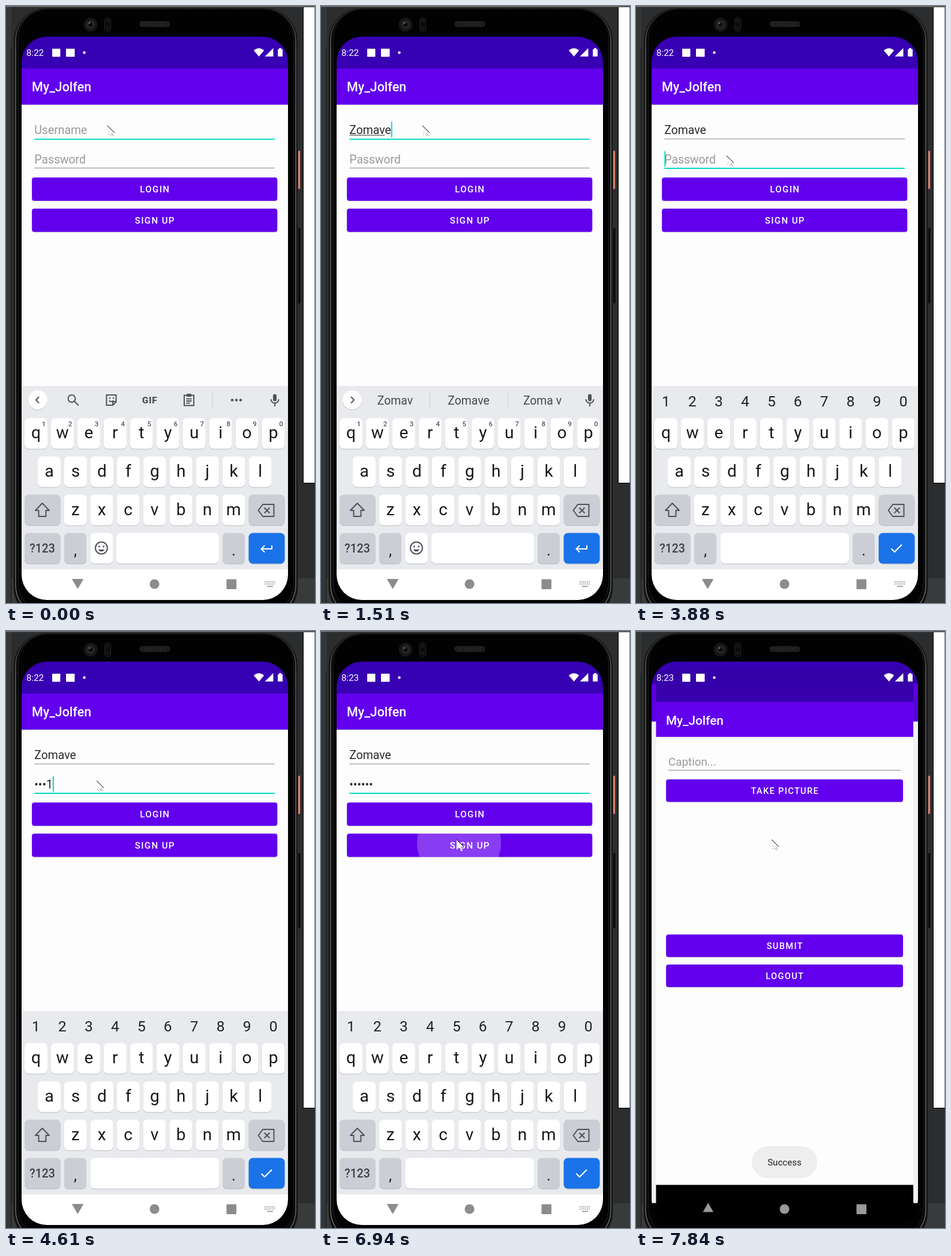
An HTML page for the animation above (7.99 s loop, 515 px wide and 993 px high).

```html
<!DOCTYPE html>
<html lang="en">
<head>
<meta charset="utf-8">
<title>Phone login</title>
<style>
html, body { margin: 0; width: 100%; height: 100%; overflow: hidden; background: #2b2d2e; }
svg { display: block; width: 515px; height: 993px; font-family: Roboto, "Open Sans", sans-serif; }
.line { fill: none; stroke: #50545a; stroke-width: 2; }
.mid { text-anchor: middle; }
.btn { font-size: 15.1px; font-weight: 500; letter-spacing: 1.35px; fill: #fff; text-anchor: middle; }
text { white-space: pre; }
</style>
</head>
<body>
<svg id="stage" viewBox="0 0 515 993"></svg>
<script>
const LOOP = 7990;
const USER = "Zomave", APP = "My_Jolfen";
const PURPLE = "#6200ee", DEEP = "#3700b3", TEAL = "#03dac5", PAPER = "#fdfdfd";
const FIELD_X = 47.3, FIELD_SIZE = 19.4;

const rect = (x, y, w, h, fill, rx = 0, more = "") =>
  `<rect x="${x}" y="${y}" width="${w}" height="${h}" rx="${rx}" fill="${fill}" ${more}/>`;
const circle = (x, y, r, fill, more = "") => `<circle cx="${x}" cy="${y}" r="${r}" fill="${fill}" ${more}/>`;
const path = (d, more = 'class="line"') => `<path d="${d}" ${more}/>`;
const text = (x, y, size, fill, s, more = "") =>
  `<text x="${x}" y="${y}" font-size="${size}" fill="${fill}" ${more}>${s}</text>`;
const group = (id, body, more = "") => `<g id="${id}" ${more}>${body}</g>`;
const mid = 'class="mid"';

const button = (x, y, w, h, label, size = 15.1) =>
  rect(x, y + 1, w, h, "#000", 4, 'opacity=".15"') + rect(x, y, w, h, PURPLE, 4) +
  `<text class="btn" x="248.3" y="${y + h / 2 + size * .36}" style="font-size:${size}px">${label}</text>`;

function phone() {
  return rect(0, 0, 515, 993, "#2b2d2e") + rect(0, 952, 515, 41, "#383b3b") +
    rect(0, 0, 9, 993, "#343738") + rect(8, 70, 1, 923, "#161616") +
    rect(495, 0, 20, 794, "#000") + rect(496, 2, 18.5, 791, "#fff") +
    rect(0, 0, 515, 1.5, "#777") +
    rect(486, 240, 5, 65, "#5a3a34", 1) + rect(487, 241, 3, 63, "#dc7f6c", 1) +
    rect(486, 369, 5, 126, "#0b0b0b", 1, 'stroke="#3c3c3c" stroke-width=".6"') +
    rect(12.5, 2.5, 474, 1020, "#111", 56, 'stroke="#303030"') +
    rect(16, 4, 467, 1013, "#090909", 54, 'stroke="url(#rim)" stroke-width="1.5"') +
    rect(20.5, 5, 459, 1004, "#020202", 50, 'stroke="#1c1c1c"') +
    circle(141, 31, 11.5, "#161616") + circle(141, 31, 7, "#25282a") + circle(141, 31, 3.5, "#0b0c0e") +
    circle(139, 28.5, 1.3, "#777") +
    rect(164.5, 19, 10, 24, "#0c0c0c", 5, 'stroke="#242424"') +
    circle(169.5, 24.5, 3, "#161616") + circle(169.5, 37, 3, "#161616") +
    rect(223, 26, 50, 8, "#171717", 4, 'stroke="#303030"') +
    path("M227 30H269", 'stroke="#333" stroke-width="5" stroke-dasharray="1 2"');
}

function statusBar() {
  const white = 'fill="#fff"';
  return text(34, 83, 15.1, "#fff", "8:22", 'id="clock"') +
    rect(77, 71, 13.5, 13.5, "#fff", 1) + rect(100, 71, 14.5, 13.5, "#fff", 1) +
    circle(130.5, 77.5, 2.2, "#fff") +
    path("M413 74Q421.5 66.5 430 74L421.5 84Z", white) + path("M445.5 70V84H431.5Z", white) +
    path("M453 72H455V70H459V72H461V84H453Z", white);
}

function loginScreen() {
  return rect(26, 51, 444, 53, DEEP) + rect(26, 104, 444, 60, PURPLE) + rect(26, 164, 444, 774, PAPER) +
    rect(26, 164, 444, 1, "#ddd") +
    text(43, 142, 21.4, "#fff", APP, 'font-weight="500"') +
    text(FIELD_X, 213, FIELD_SIZE, "#999", "Username", 'id="user"') +
    text(FIELD_X, 261.8, FIELD_SIZE, "#999", "Password", 'id="pass"') +
    rect(FIELD_X, 214.5, 0, 1, "#333", 0, 'id="composing"') +
    rect(47.3, 220.6, 400.6, 2, TEAL, 0, 'id="userLine"') +
    rect(47.3, 269, 400.6, 1, "#888", 0, 'id="passLine"') +
    rect(FIELD_X, 192.5, 2, 26, TEAL, 0, 'id="caret"') +
    button(43.2, 285.2, 409, 38.8, "LOGIN") + button(43.2, 337, 409, 38.8, "SIGN UP") +
    circle(230, 352, 0, "#fff", 'id="ripple" clip-path="url(#signUp)"');
}

const mic = path("M448 645.5a3 3 0 0 1 3 3v6a3 3 0 0 1-6 0v-6a3 3 0 0 1 3-3Z", 'fill="#50545a"') +
  path("M441.5 654a6.5 6.5 0 0 0 13 0M448 661v5");
const chevron = (x, d) => circle(x, 656, 16.3, "#000", 'opacity=".12"') + circle(x, 655, 16, "#fff") +
  path(`M${x - d * 2} 650l${d * 5} 5.3l${-d * 5} 5.3`);
const smiley = (x, y, r) => circle(x, y, r, "none", 'class="line"') +
  circle(x - 3.7, y - 2.5, 1.5, "#50545a") + circle(x + 3.7, y - 2.5, 1.5, "#50545a") +
  path(`M${x - 5} ${y + 2.5}a5.4 5.4 0 0 0 10 0Z`, 'fill="#50545a"');

const COLUMN = i => 50 + 43.95 * i;

function toolbar() {
  const icons = chevron(53, -1) +
    circle(109.5, 653, 6, "none", 'class="line"') + path("M114 657.5l7 7") +
    path("M169 647H183.5V658.5L178 664H167.5V647ZM183.5 658H178V664") +
    circle(173, 652, 1.3, "#50545a") + circle(179, 652, 1.3, "#50545a") + path("M172 656a4 4 0 0 0 7 0") +
    text(239.5, 660.7, 15.5, "#50545a", "GIF", 'class="mid" font-weight="900" letter-spacing=".6"') +
    path("M297 647.5H313V664.5H297ZM300.5 653.5H309.5M300.5 657H309.5M300.5 660.5H306.5") +
    rect(301, 645, 8, 5, "#50545a", 1) + rect(343.5, 643, 1, 24, "#c8cacd") +
    [377, 384, 391].map(x => circle(x, 655.5, 2.2, "#50545a")).join("") + mic;
  const words = chevron(52, 1) + rect(181, 643, 1, 25, "#c8cacd") + rect(311, 643, 1, 25, "#c8cacd") +
    [123.5, 246, 369].map((x, i) => text(x, 663, 19.4, "#454a4f", "", `class="mid" id="word${i}"`)).join("") + mic;
  const digits = [..."1234567890"].map((d, i) => text(COLUMN(i), 665.5, 24.5, "#202124", d, mid)).join("");
  return group("icons", icons) + group("words", words) + group("digits", digits);
}

function keyboard() {
  const key = (x, y, w, fill = "#fff") =>
    rect(x, y + 1, w, 51, "#b9bdc3", 7) + rect(x, y, w, 51, fill, 7);
  const [row1, row2, row3, row4] = [0, 1, 2, 3].map(i => 685.5 + 63.65 * i);
  const row = (letters, x, y) => [...letters].map((c, i) =>
    key(x + 43.95 * i, y, 38) + text(x + 19 + 43.95 * i, y + 33.7, 28, "#16181a", c, mid)).join("");
  const hints = [..."1234567890"].map((d, i) =>
    text(COLUMN(i) + 13, 698.5, 11.5, "#50545a", d, 'class="mid" font-weight="500"')).join("");
  const grey = "#cbced5", thick = 'class="line" stroke-linejoin="round"';
  const white = 'fill="none" stroke="#fff" stroke-width="2.1"';
  return rect(26, 632, 444, 306, "#e8eaed") + toolbar() +
    row("qwertyuiop", 31, row1) + row("asdfghjkl", 53, row2) + row("zxcvbnm", 96.7, row3) +
    group("hints", hints) +
    key(31, row3, 59.7, grey) + path("M60.5 827L72 839H66.5V849H54.5V839H49Z", thick) +
    key(404.5, row3, 60, grey) +
    path("M428 829H446.5V849H428L420.5 839ZM430.5 834.5l9 9M439.5 834.5l-9 9", thick) +
    key(31, row4, 59.7, grey) + text(60.5, 909, 19.4, "#3c4043", "?123", 'class="mid" font-weight="500"') +
    key(97, row4, 37, grey) + text(115.5, 914, 26, "#202124", ",", mid) +
    group("textRow", key(140.5, row4, 37.7) + smiley(159, 901.5, 10) + key(184, row4, 171)) +
    group("passRow", key(140.5, row4, 214.5)) +
    key(361, row4, 37, grey) + text(379.5, 914, 26, "#202124", ".", mid) +
    key(404.5, row4, 60, "#1a73e8") +
    path("M443 897V903H425.5M431 897.5l-5.5 5.5l5.5 5.5", white + ' id="enter"') +
    path("M425.5 902.5l5.5 5.5L443 896", white + ' id="done"');
}

function navBar() {
  const grey = 'fill="#8c8c8c"';
  const dots = [0, 1, 2, 3, 4, 5].map(i =>
    rect(431 + i * 3.1, 957, 1.8, 1.8, "#999") + rect(431 + i * 3.1, 960.5, 1.8, 1.8, "#999")).join("");
  return rect(26, 937, 444, 51, "#fff") + path("M110.5 953.5H128.5L119.5 969Z", grey + ' stroke="#8c8c8c" stroke-linejoin="round"') +
    circle(247.5, 961.5, 8, "#8c8c8c") + rect(367.5, 953.5, 16.5, 16.5, "#8c8c8c", 1) +
    dots + rect(435, 964.5, 10, 1.8, "#999");
}

function homeScreen() {
  const card = (y, h, fill) => rect(33.4, y, 428.8, h, fill);
  return rect(26, 51, 444, 937, "#000") + rect(26, 51, 444, 37, "url(#bar)") +
    rect(26, 88, 444, 62.5, "#5b00de") + rect(26, 150.5, 444, 801, "#f2f2f5") +
    card(51, 67, "url(#bar)") + card(118, 58.3, PURPLE) +
    card(176.3, 745, PAPER) + card(176.3, 1.2, "#ddd") + card(921.3, 67, "#000") +
    text(50, 155.5, 20.7, "#fff", APP, 'font-weight="500"') +
    text(54, 224, 18.8, "#999", "Caption...") + rect(54, 231, 387, 1, "#888") +
    button(50.1, 246.8, 395, 37.4, "TAKE PICTURE", 14.6) +
    button(50.1, 504.8, 395, 37.4, "SUBMIT", 14.6) + button(50.1, 554.8, 395, 37.4, "LOGOUT", 14.6) +
    path("M111.5 966.5H129L120.2 951Z", 'fill="#999"') +
    circle(247.5, 961.5, 8, "#999") + rect(367.5, 953.5, 16.5, 16.5, "#999", 1) +
    rect(193, 857, 109, 53, "#eee", 26.5) + text(247.5, 889.3, 15.1, "#222", "Success", mid);
}

const stage = document.getElementById("stage");
stage.innerHTML = `<defs>
  <clipPath id="screen">${rect(26, 51, 444, 937, "#fff", 42)}</clipPath>
  <clipPath id="signUp">${rect(43.2, 337, 409, 38.8, "#fff", 4)}</clipPath>
  <linearGradient id="bar" gradientUnits="userSpaceOnUse" x1="0" x2="0" y1="56" y2="118">
    <stop stop-color="${DEEP}"/><stop offset=".2" stop-color="#3500a8"/><stop offset="1" stop-color="#3700ae"/>
  </linearGradient>
  <linearGradient id="rim" gradientUnits="userSpaceOnUse" x1="0" x2="0" y1="4" y2="70">
    <stop stop-color="#222"/><stop offset="1" stop-color="#666"/>
  </linearGradient>
  </defs>` + phone() +
  group("display",
    group("login", loginScreen() + keyboard() + navBar() +
      group("toast", rect(194, 863, 107, 27, "#eee", 2, 'opacity=".55"') +
        text(247.5, 889.3, 15.1, "#999", "Success", mid))) +
    group("home", homeScreen()) + statusBar(), 'clip-path="url(#screen)"') +
  group("pointer", path("M0 0L12 12H7.2L10.5 18L7.6 19.2L4.6 13.2L0 17Z", 'fill="#fff"') +
    path("M0 0L12 12", 'stroke="#000" stroke-width="1"') +
    path("M2 11h2M7 12.5l2 1.5M5.5 14l2 3.5M8.5 14.5l1.5 3M1.5 14.5h1", 'stroke="#222" stroke-width=".8" stroke-dasharray="1.2 .8"'));

const $ = Object.fromEntries([...stage.querySelectorAll("[id]")].map(e => [e.id, e]));
const show = (el, on) => el.setAttribute("display", on ? "inline" : "none");
const set = (el, attrs) => { for (const k in attrs) el.setAttribute(k, attrs[k]); };
const label = (el, s) => { if (el.textContent !== s) el.textContent = s; };
// Latest entry whose start time has passed.
const at = (steps, t) => steps.reduce((now, s) => t >= s[0] ? s : now);

// start, letters typed, letters already seen by the keyboard
const typing = [[0, 0, 0], [550, 1, 0], [690, 2, 1], [820, 3, 2], [960, 4, 3], [1100, 4, 4],
  [1240, 5, 4], [1370, 5, 5], [1510, 6, 5], [1630, 6, 6]];
const secret = [[0, 0], [4020, 1], [4170, 2], [4310, 3], [4610, 4], [4800, 5], [5170, 6]];
const blink = [[0, 0], [130, 1], [2040, 0], [2590, 1], [3310, 0], [3880, 1], [5560, 0], [6110, 1], [6660, 0], [7230, 1]];
const moves = [[0, 169, 199], [2180, 165, 209], [2320, 157, 233], [2450, 151, 249],
  [5840, 158, 258], [5980, 181, 288], [6110, 205, 320], [6250, 221, 341], [6390, 226, 347]];
const ripples = [[0, 0, 0], [6800, 70, .24], [6950, 230, .2], [7090, 230, .1], [7230, 0, 0]];
const guesses = [["", "", ""], ["Z", "Zoo", "Zone"], ["Zo", "Zoo", "Zoom"], ["Zom", "Zoom", "Zombie"],
  ["Zoma", "Zomave", "Zom a"], ["Zomav", "Zomave", "Zoma v"], [USER, USER + "'s", USER + "ville"]];

function render(t) {
  const [, typed, seen] = at(typing, t);
  const count = at(secret, t)[1];
  const onPass = t >= 2890, pressed = t >= 2760;

  show($.login, t < 7840);
  show($.home, t >= 7840);
  label($.clock, t < 4980 ? "8:22" : "8:23");

  label($.user, typed ? USER.slice(0, typed) : "Username");
  set($.user, { fill: typed ? "#2a2a2a" : "#999" });
  const masked = t >= 6660 ? "•".repeat(6) : "•".repeat(Math.max(0, count - 1)) + "1";
  label($.pass, count ? masked : "Password");
  set($.pass, { fill: count ? "#2a2a2a" : pressed && !onPass ? "#777" : "#999" });

  set($.userLine, { height: onPass ? 1 : 2, fill: onPass ? "#888" : TEAL });
  set($.passLine, { height: pressed ? 2 : 1, fill: pressed ? TEAL : "#888" });
  set($.composing, { width: seen && !onPass ? $.user.getSubStringLength(0, seen) : 0 });

  const field = onPass ? $.pass : $.user;
  const filled = onPass ? count : typed;
  show($.caret, at(blink, t)[1]);
  set($.caret, { x: FIELD_X + (filled && t < 7840 ? field.getComputedTextLength() : 0), y: onPass ? 241.5 : 192.5 });

  show($.icons, !onPass && !seen);
  show($.words, !onPass && seen);
  guesses[seen].forEach((w, i) => {
    label($["word" + i], w);
    set($["word" + i], { "font-size": w.length > 9 ? 18.4 : 19.4 });
  });
  for (const id of ["digits", "passRow", "done"]) show($[id], onPass);
  for (const id of ["hints", "textRow", "enter"]) show($[id], !onPass);

  const [, r, opacity] = at(ripples, t);
  set($.ripple, { r, opacity });
  show($.toast, t >= 7230);
  set($.toast, { opacity: t < 7690 ? .6 : 1 });

  const [, x, y] = at(moves, t);
  set($.pointer, { transform: `translate(${x} ${y})` });
}

const start = performance.now();
function tick() {
  render((performance.now() - start) % LOOP);
  requestAnimationFrame(tick);
}
tick();
</script>
</body>
</html>
```
